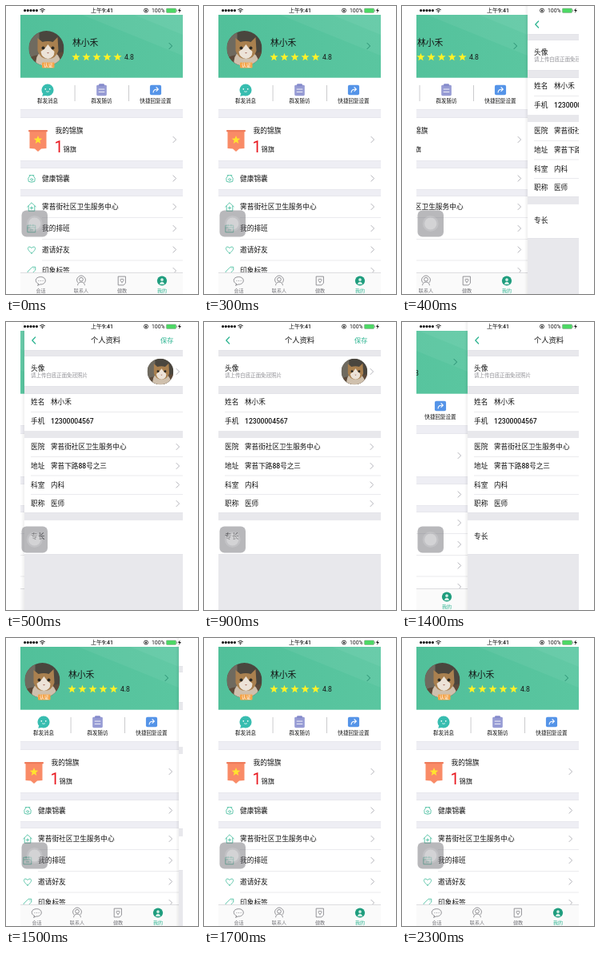
An HTML page for the animation above (2400 ms loop, 240 by 360 pixels).

```html
<!DOCTYPE html>
<html lang="zh-CN">
<head>
<meta charset="utf-8">
<title>个人资料</title>
<style>
html, body { margin: 0; width: 100%; height: 100%; overflow: hidden; background: #fff; }
svg { display: block; width: 240px; height: 360px; }
text { font-family: Roboto, "Noto Sans CJK SC", "Noto Sans CJK", sans-serif; font-weight: 500; }
.light { font-weight: 400; }
</style>
</head>
<body>
<svg id="stage" viewBox="0 0 240 360"></svg>
<script>
const TEAL = '#2fb592', GREY = '#eeeef4', INK = '#151515', WIDTH = 203;

// Drawing helpers; text is placed by its vertical centre.
const text = (x, y, size, str, fill = INK, anchor = 'start', extra = '') =>
  `<text x="${x}" y="${y + size * 0.37}" font-size="${size}" fill="${fill}" text-anchor="${anchor}" ${extra}>${str}</text>`;
const rect = (x, y, w, h, fill, extra = '') =>
  `<rect x="${x}" y="${y}" width="${w}" height="${h}" fill="${fill}" ${extra}/>`;
const circle = (x, y, r, fill, extra = '') =>
  `<circle cx="${x}" cy="${y}" r="${r}" fill="${fill}" ${extra}/>`;
const path = (d, fill, extra = '') => `<path d="${d}" fill="${fill}" ${extra}/>`;
const stroke = (d, color, width = 0.9) =>
  path(d, 'none', `stroke="${color}" stroke-width="${width}" stroke-linecap="round" stroke-linejoin="round"`);
const at = (x, y, body, scale = 1) => `<g transform="translate(${x} ${y}) scale(${scale})">${body}</g>`;
const band = (top, bottom, fill = GREY) =>
  rect(18, top, WIDTH, bottom - top, fill) +
  rect(18, top, WIDTH, 0.5, '#dfdfe5') + rect(18, bottom - 0.5, WIDTH, 0.5, '#dfdfe5');
const rule = (x, y) => rect(x, y, 221 - x, 0.6, '#dedee2');
const chevron = (x, y, color = '#b4b4ba') => stroke(`M${x - 2} ${y - 3.6}l3.6 3.6l-3.6 3.6`, color, 1);

function star(x, y, r, fill) {
  const points = Array.from({ length: 10 }, (_, i) => {
    const a = i * Math.PI / 5 - Math.PI / 2, q = i % 2 ? r * 0.42 : r;
    return `${(x + q * Math.cos(a)).toFixed(2)},${(y + q * Math.sin(a)).toFixed(2)}`;
  });
  return `<polygon points="${points.join(' ')}" fill="${fill}"/>`;
}

// Cat portrait drawn in a unit of radius 22.
const cat = (x, y, r) => at(x, y, `<g clip-path="url(#round)">
  ${rect(-22, -22, 44, 44, '#4a463e')}
  ${rect(-22, -22, 13, 44, '#6f6a5f')}
  ${path('M-22 12Q-12 6-4 10L22 4V22H-22Z', '#5d4a3a')}
  ${path('M-13 22Q-14 8-7 5H11Q19 12 18 22Z', '#cfc0ad')}
  ${path('M-11 3L-11-13L-5-8Q2-10 8-8L14-14L15 3Q12 13 2 13Q-8 13-11 3Z', '#a9804f')}
  ${path('M2-5Q5 0 10 4Q10 12 2 13Q-6 12-7 4Q-1 0 2-5Z', '#ece3d8')}
  ${circle(-4, -0.5, 2, '#2d2a24')}${circle(8, -0.5, 2, '#2d2a24')}
  ${path('M0.5 5H3.5L2 6.6Z', '#a96f62')}
</g>`, r / 22);

const icons = {
  chat: circle(0, 0, 7.8, '#38bdb0') + path('M-6 5L-7 8L-1 7Z', '#38bdb0') +
    circle(-2.8, -1.2, 0.9, '#fff') + circle(2.8, -1.2, 0.9, '#fff') + stroke('M-1.6 2Q0 3 1.6 2', '#fff', 0.8),
  clip: rect(-6.5, -6.5, 13, 14, '#969bd4', 'rx="1.5"') + rect(-3.5, -8, 7, 3, '#858bcb', 'rx="1"') +
    stroke('M-3.5-1H3.5M-3.5 2.5H3.5', '#fff'),
  reply: rect(-7.3, -6.5, 14.6, 13, '#5594e8', 'rx="2"') + stroke('M-3 3Q-3-1 3-1M1-3.5L3.5-1L1 1.5', '#fff', 1.1),
  pouch: stroke('M-3-4H3M-2-4Q-6 0-4 4Q0 6 4 4Q6 0 2-4M0 3L-1.7 1.2Q-1-.4 0 .8Q1-.4 1.7 1.2Z', TEAL, 0.8),
  house: stroke('M-5.5 0L0-5.5L5.5 0M-4-1V5.5H4V-1M-1.8 1.5H1.8M0-.3V3.3', TEAL, 0.8),
  roster: stroke('M-5-4H5V5H-5ZM-5-1H5M-2-5V-3M2-5V-3M-2 2H2', TEAL, 0.8),
  heart: stroke('M0 4.8C-8.5-1-4-6.5 0-2C4-6.5 8.5-1 0 4.8Z', TEAL, 0.8),
  tag: stroke('M-5 1L1-5H5V-1L-1 5ZM3-3H2.9', TEAL, 0.8),
  bubble: stroke('M-3 4L-4 6L-1 4.6C8 5 8-5 0-5C-8-5-8 2-3 4M-2.6 0H-2.5M0 0H.1M2.6 0H2.7', '#77777c', 0.8),
  person: circle(0, -1.8, 2.4, 'none', 'stroke="#77777c" stroke-width=".8"') +
    stroke('M-4.5 5.5Q-4 1.6 0 1.6Q4 1.6 4.5 5.5M-4.5 2A5.4 5.4 0 1 1 4.5 2', '#77777c', 0.8),
  lesson: stroke('M-4.5-5.5H4.5V3L2 5.5H-4.5ZM0 2C-4-1-1-4 0-1.5C1-4 4-1 0 2Z', '#77777c', 0.8),
  me: circle(0, 0, 6.2, '#1f9d7e') + circle(0, -1.4, 1.8, '#d5f0e7') + path('M-3 4.6Q-2.4 1.4 0 1.4Q2.4 1.4 3 4.6Z', '#d5f0e7')
};

function homePage() {
  const header = rect(18, 11, WIDTH, 78.7, 'url(#mint)') +
    path('M95 11H221V62Z', '#fff', 'opacity=".05"') +
    path('M160 11H221V36Z', '#fff', 'opacity=".05"') +
    cat(50.5, 53, 22) + rect(45, 70.5, 15.5, 7, '#f4a44a', 'rx="1"') + text(52.7, 74, 6, '认证', '#fff', 'middle') +
    text(83, 46, 10.8, '林小禾', INK, 'start', 'class="light"') +
    [0, 1, 2, 3, 4].map(i => star(87.5 + 13 * i, 64, 5.3, '#fff226')).join('') +
    text(148, 64, 8.6, '4.8', INK, 'start', 'class="light"') + chevron(206, 50, '#278d70');

  const actions = [[52, 'chat', '群发消息'], [119.5, 'clip', '群发随访'], [187, 'reply', '快捷回复设置']]
    .map(([x, icon, label]) => at(x, 105, icons[icon], 0.97) + text(x, 119, 6.55, label, INK, 'middle')).join('') +
    rect(85.7, 99, 0.7, 20, '#b5b5b8') + rect(153, 99, 0.7, 20, '#b5b5b8');

  const pennant = path('M29.5 156H50.5V178L44 178.5L40 182L36 178.5L29.5 178Z', '#f98b67') +
    rect(28, 155, 24, 2.2, '#ee7c5c', 'rx="1"') + star(40, 167.5, 5.6, '#ffe42e') +
    text(61.5, 155.4, 8.75, '我的锦旗') + text(60.5, 176, 19.5, '1', '#e8161d', 'start', 'class="light"') +
    text(71.5, 179, 8.3, '锦旗') + chevron(211, 167);

  const rows = [[215.5, 'pouch', '健康锦囊'], [251, 'house', '霁苔街社区卫生服务中心'], [278, 'roster', '我的排班'],
    [304.5, 'heart', '邀请好友'], [331, 'tag', '印象标签']]
    .map(([y, icon, label]) => at(32, y, icons[icon], 0.95) + text(45, y, 8.7, label) + chevron(211, y)).join('') +
    [264.3, 291, 317.7].map(y => rule(45, y)).join('');

  const tabs = rect(18, 333, WIDTH, 27, '#fafafa') + rect(18, 333, WIDTH, 0.6, '#c9c9cd') +
    [[43.5, 'bubble', '会话'], [94, 'person', '联系人'], [145, 'lesson', '健教'], [195, 'me', '我的']]
      .map(([x, icon, label]) => at(x, 343.5, icons[icon], 0.98) +
        text(x, 355.5, 6.1, label, icon === 'me' ? TEAL : '#77777c', 'middle')).join('');

  return rect(18, 0, WIDTH, 360, '#fff') + header + actions + band(129, 140) + pennant +
    band(193, 203) + band(229, 238) + rows + tabs;
}

function profilePage() {
  const fields = [[100, '姓名', '林小禾'], [124, '手机', '12300004567'], [156, '医院', '霁苔街社区卫生服务中心'],
    [180, '地址', '霁苔下路88号之三'], [203.5, '科室', '内科'], [227, '职称', '医师']]
    .map(([y, label, value]) => text(26, y, 8.7, label) + text(51, y, 8.6, value) + (y > 150 ? chevron(210, y) : '')).join('');
  return rect(18, 0, WIDTH, 360, '#fff') +
    stroke('M31.6 19L27.8 23L31.6 27', TEAL, 1.3) + text(119.5, 23, 9.3, '个人资料', INK, 'middle') +
    text(188, 23, 8.2, '保存', TEAL) +
    band(35, 43, '#e8e8ec') + band(80, 90, '#e8e8ec') + band(136.5, 144.5, '#e8e8ec') +
    band(238, 247.5, '#e8e8ec') + band(290, 361, '#e8e8ec') +
    text(26, 58, 8.7, '头像') + text(26, 67, 6.45, '请上传白底正面免冠照片', '#8c8c92') +
    cat(188, 62, 16.3) + chevron(210, 62) + fields +
    [112, 168, 191.7, 215.3].map(y => rule(26, y)).join('') + text(26, 268, 8.7, '专长');
}

function statusBar() {
  const dots = [0, 1, 2, 3, 4].map(i => circle(23.6 + 3.7 * i, 5.6, 1.55, '#111')).join('');
  return dots + stroke('M42.6 4.5Q45.5 2 48.4 4.5M43.9 6Q45.5 4.6 47.1 6', '#111', 1) + circle(45.5, 7.4, 0.8, '#111') +
    text(120, 5.6, 7, '上午9:41', '#111', 'middle') +
    circle(175, 5.6, 2.5, 'none', 'stroke="#111" stroke-width=".8"') + rect(174, 4.8, 2, 1.8, '#111') +
    text(182, 5.6, 6.9, '100%', '#111', 'start', 'class="light"') +
    rect(200.4, 3, 12.2, 5.4, '#4cd964', 'rx="1" stroke="#8a938c" stroke-width=".5"') + rect(213.2, 4.6, 0.9, 2.2, '#8a938c') +
    path('M217.6 2.2L215 6H216.8L216 9L218.9 4.9H217Z', '#111');
}

document.getElementById('stage').innerHTML = `
<defs>
  <clipPath id="phone"><rect x="18" y="0" width="${WIDTH}" height="360"/></clipPath>
  <clipPath id="round"><circle r="22"/></clipPath>
  <linearGradient id="mint" x1="0" y1="0" x2="1" y2="0">
    <stop offset="0" stop-color="#51c09a"/><stop offset="1" stop-color="#5ac6a0"/>
  </linearGradient>
  <linearGradient id="shade"><stop offset="0" stop-opacity="0"/><stop offset="1" stop-opacity=".06"/></linearGradient>
</defs>
<g clip-path="url(#phone)">
  <g id="track">
    ${homePage()}
    ${rect(217, 0, 4, 360, 'url(#shade)', 'id="edge"')}
    <g transform="translate(${WIDTH} 0)">${profilePage()}</g>
  </g>
  ${statusBar()}
  ${rect(19.5, 255.5, 32.5, 33, '#737379', 'rx="6" opacity=".5"')}
  ${circle(35.7, 272, 10, '#fff', 'opacity=".15"')}
  ${circle(35.7, 272, 7.6, '#fff', 'opacity=".28"')}
</g>`;

// Slide steps: [time in ms, distance to the left].
const LOOP = 2400;
const slide = [[0, 0], [400, 64], [500, 198], [600, 203], [1400, 139], [1500, 5], [1600, 0], [LOOP, 0]];
const play = (id, frame) => document.getElementById(id).animate(
  slide.map(([time, x]) => ({ offset: time / LOOP, easing: 'step-end', ...frame(x) })),
  { duration: LOOP, iterations: Infinity });
play('track', x => ({ transform: `translateX(${-x}px)` }));
play('edge', x => ({ opacity: x % WIDTH ? 1 : 0 }));
</script>
</body>
</html>
```
